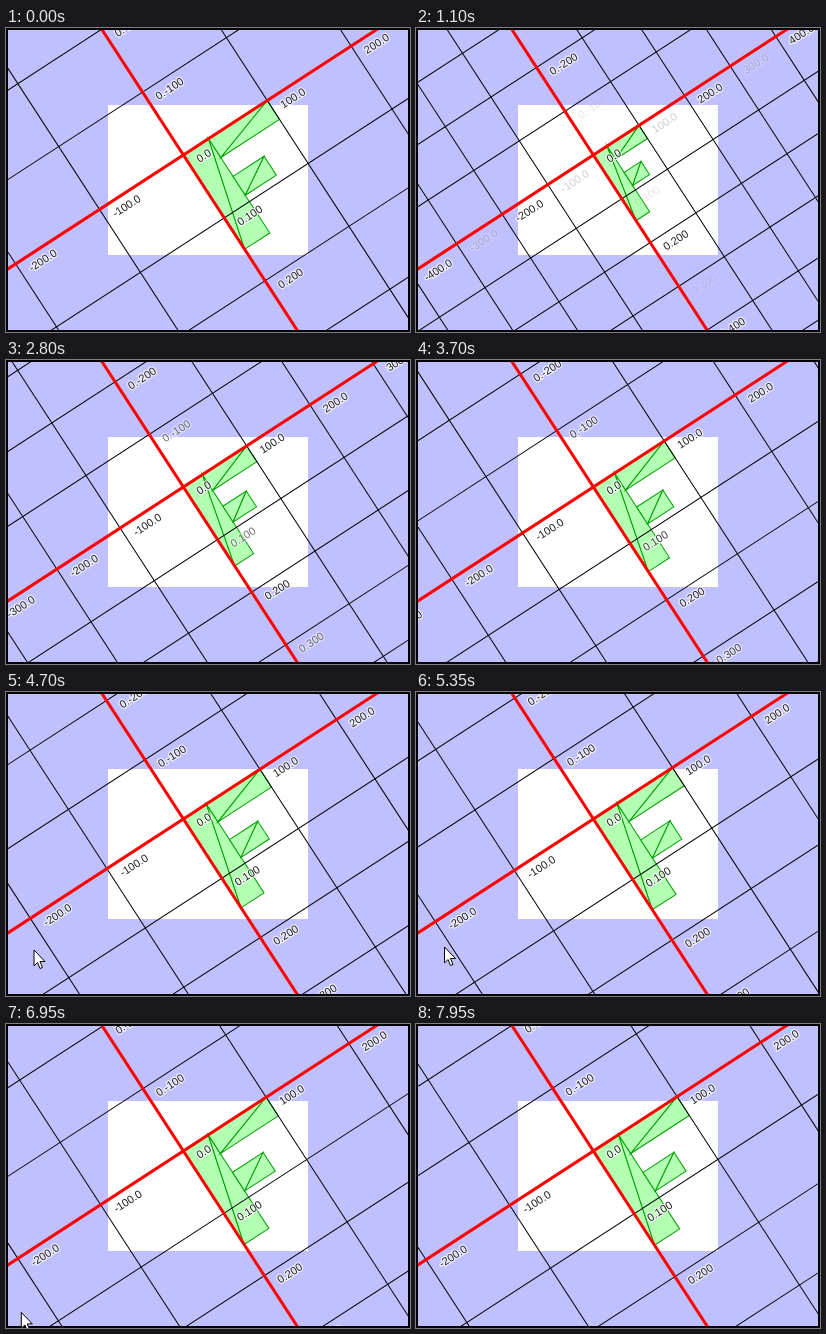
These frames come from a looping animation (404x304 px, 8000 ms). An HTML page with a canvas:

```html
<!DOCTYPE html>
<html>
<head>
<meta charset="utf-8">
<style>
  html, body { margin: 0; width: 100%; height: 100%; overflow: hidden; }
  canvas { display: block; }
</style>
</head>
<body>
<canvas id="stage" width="404" height="304"></canvas>
<script>
const ctx = document.getElementById('stage').getContext('2d');
const LOOP = 8000, STEP = 50, ZOOM_START = 300, ZOOM_TIME = 8400;
const REACH = 900;
const clamp = v => Math.max(0, Math.min(1, v));

// Triangles of the letter F, in world units
const quad = (l, t, r, b) => [[l, t, r, t, l, b], [l, b, r, t, r, b]];
const letter = [...quad(0, 0, 30, 150), ...quad(30, 0, 100, 30), ...quad(30, 60, 67, 90)];

const pointerPath = [[4300, 28, 258], [4700, 28, 258], [6000, 29, 252],
                     [6500, 27, 256], [7000, 14, 292], [7300, -14, 298]];

// Cubic Bezier easing (.25, .1, .25, 1)
function ease(u) {
  const curve = (a, b, q) => 3 * a * q * (1 - q) ** 2 + 3 * b * q * q * (1 - q) + q ** 3;
  let lo = 0, hi = 1;
  for (let i = 0; i < 24; i++) {
    const mid = (lo + hi) / 2;
    if (curve(.25, .25, mid) < u) lo = mid; else hi = mid;
  }
  return curve(.1, 1, lo);
}

const progress = t => t < ZOOM_START ? 1 : ease(clamp((t - ZOOM_START) / ZOOM_TIME));

function line(x1, y1, x2, y2, color, width) {
  ctx.strokeStyle = color;
  ctx.lineWidth = width;
  ctx.beginPath();
  ctx.moveTo(x1, y1);
  ctx.lineTo(x2, y2);
  ctx.stroke();
}

function label(text, x, y, alpha) {
  ctx.globalAlpha = alpha;
  ctx.strokeStyle = 'rgba(255,255,255,.75)';
  ctx.lineWidth = 2.5;
  ctx.strokeText(text, x + 9, y + 15.5);
  ctx.fillStyle = '#222';
  ctx.fillText(text, x + 9, y + 15.5);
  ctx.globalAlpha = 1;
}

function drawLetter(sx, sy) {
  ctx.fillStyle = '#b3ffb3';
  ctx.strokeStyle = '#00a000';
  ctx.lineWidth = 1;
  for (const [a, b, c, d, e, f] of letter) {
    ctx.beginPath();
    ctx.moveTo(a * sx, b * sy);
    ctx.lineTo(c * sx, d * sy);
    ctx.lineTo(e * sx, f * sy);
    ctx.closePath();
    ctx.fill();
    ctx.stroke();
  }
}

// Odd labels fade out as their spacing shrinks to 50 pixels
const labelAlpha = (i, scale) => i % 2 ? clamp((scale - .5) * 5) : 1;

function drawGrid(sx, sy) {
  const dx = sx * 100, dy = sy * 100;
  for (let i = -14; i <= 14; i++) {
    if (!i) continue;
    line(i * dx, -REACH, i * dx, REACH, '#000', 1);
    line(-REACH, i * dy, REACH, i * dy, '#000', 1);
  }
  line(-REACH, 0, REACH, 0, '#f00', 3);
  line(0, -REACH, 0, REACH, '#f00', 3);
  label('0.0', 0, 0, 1);
  for (let i = -10; i <= 10; i++) {
    if (!i) continue;
    label(i * 100 + '.0', i * dx, 0, labelAlpha(i, sx));
    label('0.' + i * 100, 0, i * dy, labelAlpha(i, sy));
  }
}

function drawPointer(t) {
  const next = pointerPath.findIndex(p => p[0] > t);
  if (next < 1) return;
  const [t0, x0, y0] = pointerPath[next - 1], [t1, x1, y1] = pointerPath[next];
  const k = (t - t0) / (t1 - t0);
  ctx.save();
  ctx.translate(x0 + (x1 - x0) * k, y0 + (y1 - y0) * k);
  const arrow = new Path2D('M0 0V16L3.5 12.5L6 18.5L8.5 17.5L6 11.5H11Z');
  ctx.fillStyle = '#fff';
  ctx.strokeStyle = '#000';
  ctx.lineWidth = 1;
  ctx.fill(arrow);
  ctx.stroke(arrow);
  ctx.restore();
}

function draw(t) {
  const p = progress(t), sx = .5 + .5 * p, sy = .5 + .25 * p;
  ctx.fillStyle = '#000';
  ctx.fillRect(0, 0, 404, 304);
  ctx.save();
  ctx.beginPath();
  ctx.rect(2, 2, 400, 300);
  ctx.clip();
  ctx.fillStyle = '#c0c0ff';
  ctx.fillRect(2, 2, 400, 300);
  ctx.fillStyle = '#fff';
  ctx.fillRect(102, 77, 200, 150);
  ctx.translate(177.4, 127);
  ctx.rotate(-33 * Math.PI / 180);
  ctx.font = '11px "Liberation Sans", Arial, sans-serif';
  drawLetter(sx, sy);
  drawGrid(sx, sy);
  ctx.restore();
  drawPointer(t);
}

const start = performance.now();
function frame() {
  const t = (performance.now() - start) % LOOP;
  draw(Math.floor(t / STEP) * STEP);
  requestAnimationFrame(frame);
}
frame();
</script>
</body>
</html>
```
